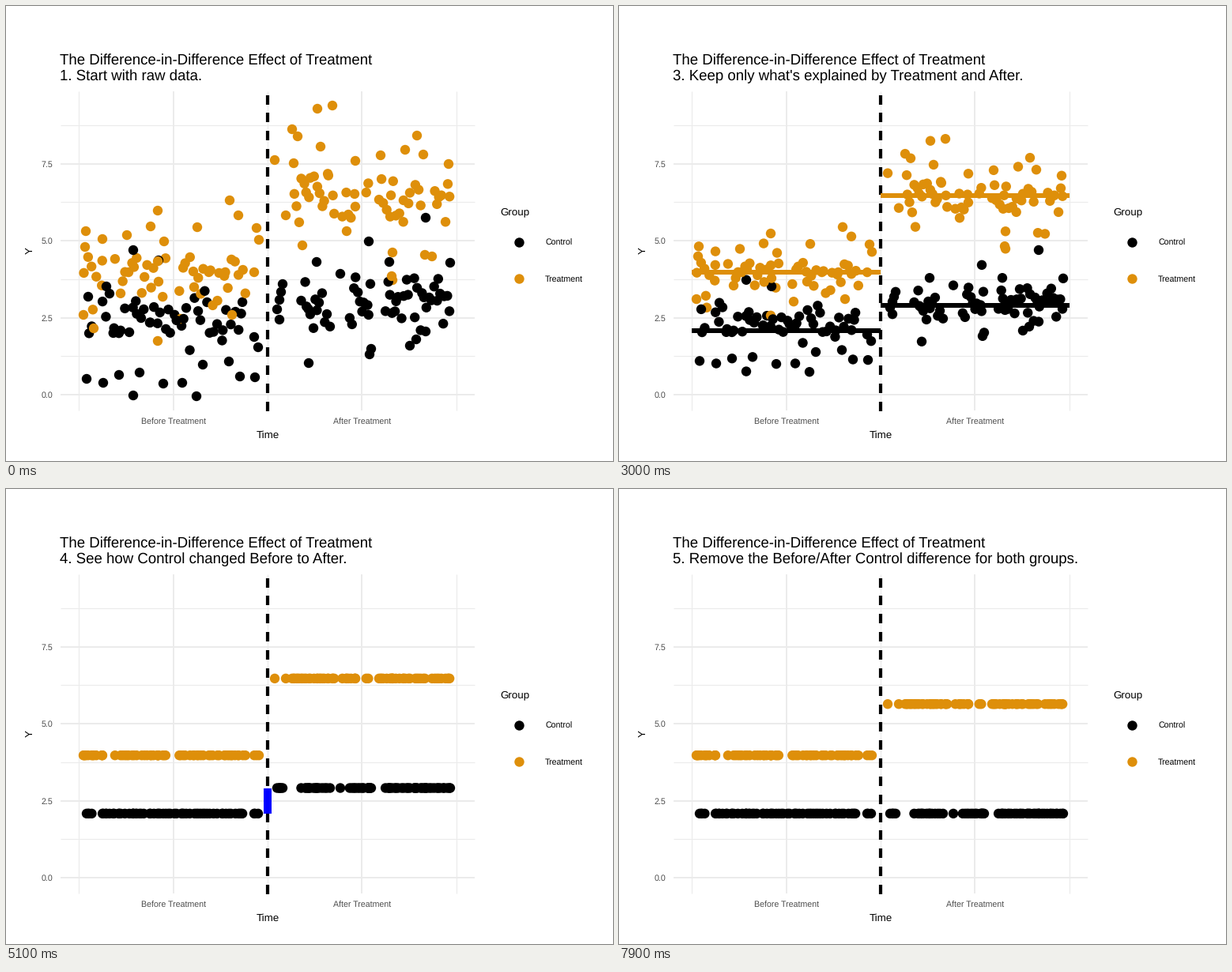
Recreate the animation shown at these times as a matplotlib script. Size 768 by 576 pixels, loop 8 s.

```python
import math

import numpy as np
import matplotlib.pyplot as plt
from matplotlib.animation import FuncAnimation

plt.rcParams["font.family"] = "Liberation Sans"
plt.rcParams["text.hinting"] = "none"

W, H, DPI = 768, 576, 96
PX = 72 / DPI                      # points per pixel
STEP = 100                         # ms per frame
ORANGE, BLACK, GRID = "#DE8F0A", "black", "#EBEBEB"
LEFT, MID, RIGHT = 92.4, 331, 569.6
DOT = (12.4 * PX) ** 2

CAPTIONS = [
    (0, "1. Start with raw data."),
    (500, "2. Explain Y using Treatment and After."),
    (2600, "3. Keep only what's explained by Treatment and After."),
    (4700, "4. See how Control changed Before to After."),
    (6800, "5. Remove the Before/After Control difference for both groups."),
]


def to_px(value):
    return 492 - 39 * value


CTRL_BEFORE, CTRL_AFTER = to_px(2.08), to_px(2.91)
TREAT_BEFORE, TREAT_AFTER = to_px(3.97), to_px(6.465)

# Each group: colour, mean, is_after, x ranges, (low, mode, high) of y,
# number of random points, and a few distinctive points.
GROUPS = [
    (ORANGE, TREAT_BEFORE, False,
     [(98, 123), (135, 204), (218, 304)], (312, 338, 388), 46,
     [(101, 285), (100, 305), (122, 295), (192, 259), (183, 279), (153, 290),
      (283, 246), (294, 265), (242, 280), (317, 281), (320, 296), (200, 298),
      (192, 424), (111, 408), (221, 396), (98, 391), (286, 391), (314, 337)]),
    (BLACK, CTRL_BEFORE, False,
     [(102, 110), (119, 303)], (350, 392, 446), 46,
     [(102, 472), (123, 477), (161, 493), (143, 467), (169, 464), (199, 478),
      (223, 477), (241, 494), (249, 454), (282, 450), (296, 469), (315, 470),
      (161, 309), (193, 322), (127, 355), (104, 368), (319, 432), (314, 419)]),
    (ORANGE, TREAT_AFTER, True,
     [(362, 417), (425, 442), (451, 460), (470, 512), (517, 528), (541, 563)],
     (203, 240, 284), 48,
     [(340, 195), (362, 156), (369, 165), (364, 199), (394, 130), (413, 126),
      (398, 178), (442, 196), (474, 189), (505, 182), (520, 164), (528, 188),
      (560, 200), (354, 265), (375, 303), (431, 285), (489, 312), (488, 342),
      (489, 347), (530, 315), (539, 317)]),
    (BLACK, CTRL_AFTER, True,
     [(373, 410), (432, 465), (480, 512), (516, 563)], (336, 378, 420), 52,
     [(383, 452), (460, 441), (462, 434), (459, 298), (531, 268), (393, 324),
      (350, 352), (348, 362), (346, 372), (343, 384), (346, 397), (485, 324),
      (423, 339), (562, 325), (511, 430), (519, 422), (531, 412)]),
]


def spread(rng, ranges, count):
    """Evenly jittered positions over a set of disjoint ranges."""
    edges = np.array(ranges, float)
    stops = np.concatenate([[0], np.cumsum(edges[:, 1] - edges[:, 0])])
    along = (np.arange(count) + rng.random(count)) / count * stops[-1]
    part = np.searchsorted(stops, along, side="right") - 1
    return edges[part, 0] + along - stops[part]


def build_points():
    rng = np.random.default_rng(11)
    rows, colors = [], []
    for color, mean, after, ranges, y_range, count, marked in GROUPS:
        xs = spread(rng, ranges, count)
        ys = rng.triangular(*y_range, count)
        for x, y in [*marked, *zip(xs, ys)]:
            rows.append((x, y, mean, after))
            colors.append(color)
    order = rng.permutation(len(rows))
    return np.array(rows, float)[order], [colors[i] for i in order]


def ease(ms, start, steps=12):
    """Sine in-out progress; the first step is already visible at start."""
    t = min(max((ms - start) / STEP + 1, 0), steps) / steps
    return (1 - math.cos(math.pi * t)) / 2


fig = plt.figure(figsize=(W / DPI, H / DPI), dpi=DPI, facecolor="white")
ax = fig.add_axes([0, 0, 1, 1])
ax.set(xlim=(0, W), ylim=(H, 0))
ax.axis("off")


def label(x, y, text, size, color="black", **kw):
    return ax.text(x, y, text, fontsize=size, color=color, va="baseline", **kw)


def rule(xs, ys, color, width, z):
    return ax.plot(xs, ys, color=color, lw=width * PX, zorder=z,
                   solid_capstyle="butt")[0]


# Grid
for value in (1.25, 3.75, 6.25, 8.75):
    rule([69, 593], [to_px(value)] * 2, GRID, 1.1, 1)
for x in (LEFT, MID, RIGHT):
    rule([x, x], [108, 512], GRID, 1.1, 1)
for value in (0, 2.5, 5, 7.5):
    rule([69, 593], [to_px(value)] * 2, GRID, 2, 1)
    label(59, to_px(value) + 4, f"{value:.1f}", 8, "#4D4D4D", ha="right")
for x, text in ((211.7, "Before Treatment"), (450.3, "After Treatment")):
    rule([x, x], [108, 512], GRID, 2, 1)
    label(x, 530, text, 8, "#4D4D4D", ha="center")

# Titles and legend
label(68.5, 74, "The Difference-in-Difference Effect of Treatment", 14)
caption = label(68.5, 94, "", 14)
label(331, 547, "Time", 10, ha="center")
ax.text(36, 310, "Y", fontsize=10, rotation=90, ha="right", va="center")
label(625.5, 264, "Group", 10)
for y, color, text in ((298.5, BLACK, "Control"), (344.7, ORANGE, "Treatment")):
    ax.scatter([648.5], [y], s=DOT, c=color, linewidths=0)
    label(682, y + 4.5, text, 8)

# Data, divider, mean lines and the difference bar
points, point_colors = build_points()
dots = ax.scatter(points[:, 0], points[:, 1], s=DOT, c=point_colors,
                  linewidths=0, zorder=3)
for k in range(18):
    bottom = 513 - 22.85 * k
    rule([MID, MID], [bottom - 12, bottom], BLACK, 4.2, 4)
means = [rule([MID, RIGHT] if after else [LEFT, MID], [mean] * 2, color, 6, 5)
         for color, mean, after, *_ in GROUPS]
bar = rule([MID, MID], [CTRL_BEFORE, CTRL_AFTER], "blue", 10, 6)


def update(frame):
    ms = frame * STEP
    caption.set_text([text for start, text in CAPTIONS if ms >= start][-1])
    x, y, mean, after = points.T
    shift = (CTRL_BEFORE - CTRL_AFTER) * ease(ms, 6800)
    y = y + (mean - y) * ease(ms, 2600) + after * shift
    dots.set_offsets(np.column_stack([x, y]))
    for line in means:
        line.set_visible(900 <= ms < 4700)
    bar.set_ydata([CTRL_BEFORE, CTRL_AFTER + shift])
    bar.set_visible(5100 <= ms < 7900)
    return [caption, dots, bar, *means]


anim = FuncAnimation(fig, update, frames=80, interval=STEP, repeat=True,
                     repeat_delay=0, blit=False)
plt.show()
```
